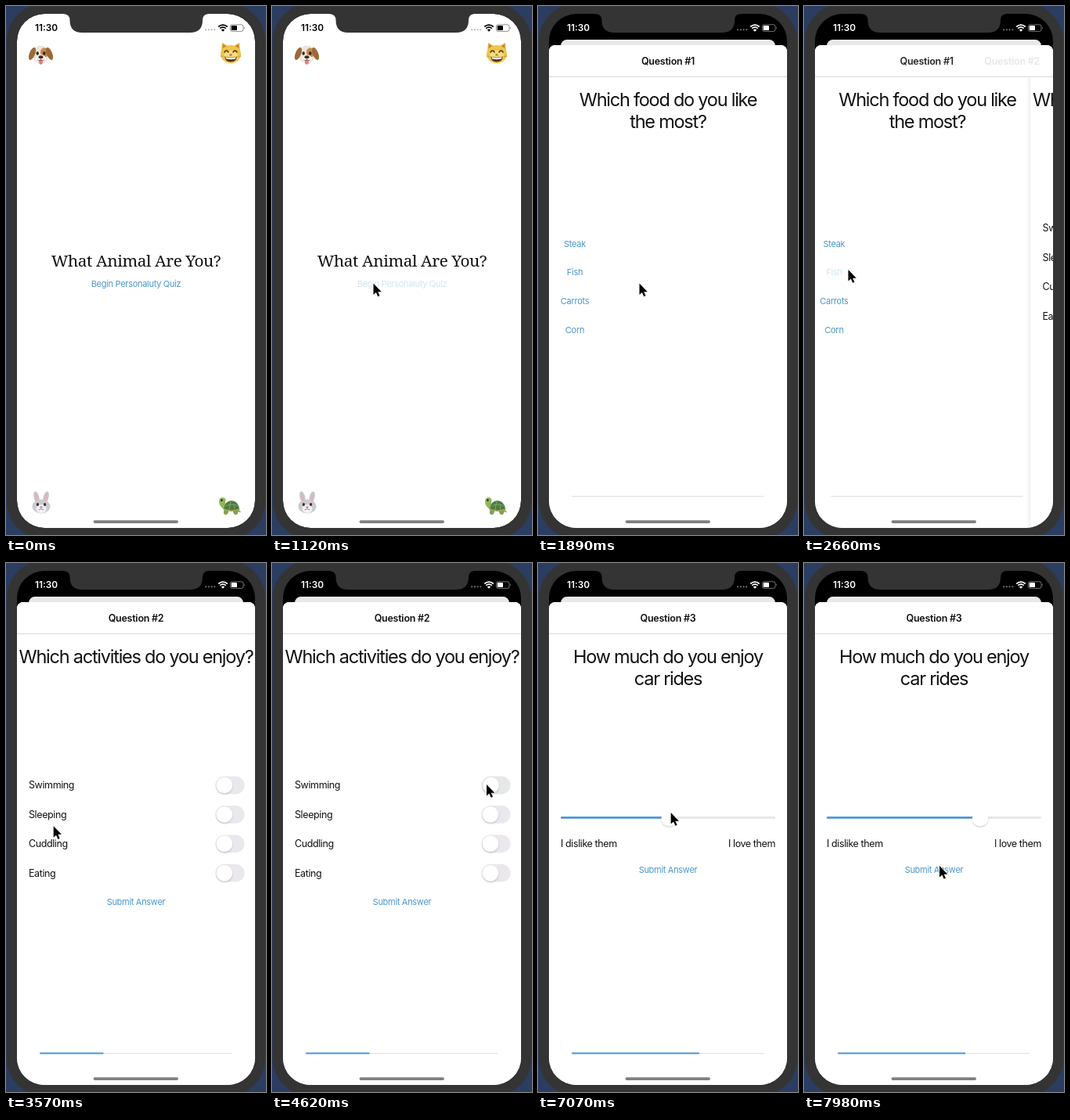
Animation, 332 px wide and 676 px high, one loop 8 s. Source, as an HTML page:

```html
<!DOCTYPE html>
<html lang="en">
<head>
<meta charset="utf-8">
<title>Animal quiz</title>
<style>
html, body { margin: 0; width: 100%; height: 100%; overflow: hidden; background: #2b3d60; }
svg { display: block; width: 332px; height: 676px; }
text { font-family: Inter, Roboto, sans-serif; font-optical-sizing: none; fill: #111; }
.mid { text-anchor: middle; }
.end { text-anchor: end; }
.hero { font: 20.8px "Noto Serif", serif; letter-spacing: -.02em; }
.ask { font-size: 23.5px; letter-spacing: -.053em; }
.title { font-size: 12.5px; font-weight: 600; letter-spacing: -.02em; }
.label { font-size: 12.5px; letter-spacing: -.032em; }
.link { font-size: 11px; letter-spacing: -.027em; fill: #4a97cb; }
.clock { font-size: 11.8px; font-weight: 600; fill: inherit; }
</style>
</head>
<body>
<svg id="stage" viewBox="0 0 332 676"></svg>
<script>
const LOOP = 8000, STEP = 70, BLUE = '#4f97d8';
const stage = document.getElementById('stage');

const text = (cls, x, y, str, id = '') => `<text class="${cls}" x="${x}" y="${y}" ${id && `id="${id}"`}>${str}</text>`;
const rect = (x, y, w, h, fill, r = 0, more = '') =>
  `<rect x="${x}" y="${y}" width="${w}" height="${h}" rx="${r}" fill="${fill}" ${more}/>`;
const oval = (x, y, rx, ry, fill, turn = 0) =>
  `<ellipse cx="${x}" cy="${y}" rx="${rx}" ry="${ry}" fill="${fill}" transform="rotate(${turn} ${x} ${y})"/>`;
const path = (d, fill, more = '') => `<path d="${d}" fill="${fill}" ${more}/>`;
const stroke = (d, color, width) => path(d, 'none', `stroke="${color}" stroke-width="${width}" stroke-linecap="round"`);
const at = (x, y, body) => `<g transform="translate(${x} ${y})">${body}</g>`;
const knob = (id, x, y) => `<circle id="${id}" cx="${x}" cy="${y}" r="10.2" fill="#fff" filter="url(#soft)"/>`;

const dog = oval(0, 0, 10.5, 11.5, '#eee4d8') + oval(4.5, -2.5, 5, 6, '#c18a4d', -15) +
  oval(-11, -1, 3.6, 8.5, '#9c6a3a', 22) + oval(11, -1, 3.6, 8.5, '#9c6a3a', -22) +
  oval(0, 5.5, 6.5, 5, '#faf5ee') + oval(0, 9.5, 2.4, 3.2, '#e87889') +
  oval(-4.3, -1.5, 1.7, 2.2, '#33251e') + oval(4.3, -1.5, 1.7, 2.2, '#33251e') +
  oval(0, 3.2, 3, 2, '#3a2c28') + stroke('M-4 7Q-1 9 0 6Q1 9 4 7', '#6b5143', .8);

const cat = path('M-12 -1L-11 -13L-4 -9H4L11 -13L12 -1Z', '#e0ae38') +
  path('M-10 -5L-9.5 -10.5L-6 -8ZM10 -5L9.5 -10.5L6 -8Z', '#b9763d') +
  oval(0, 1.5, 13, 11.5, '#efc549') + oval(0, 4, 9, 7, '#f6dc7c') +
  stroke('M-8 -1Q-5.5 -5 -3 -1M3 -1Q5.5 -5 8 -1', '#4b371c', 1.5) +
  path('M-8 4.5Q0 7 8 4.5Q7 11.5 0 11.5T-8 4.5Z', '#5b3520') +
  path('M-6.8 5.3Q0 7.2 6.8 5.3L6 7.6Q0 9 -6 7.6Z', '#fff') +
  oval(0, 2.4, 1.8, 1.2, '#b9695a') + stroke('M-13 4L-9 4.5M13 4L9 4.5', '#9a7a35', .6);

const rabbit = oval(-6, -7, 3.4, 8, '#c6c6ca', -14) + oval(6, -7, 3.4, 8, '#c6c6ca', 14) +
  oval(-6, -6.5, 1.7, 6, '#e3b3b8', -14) + oval(6, -6.5, 1.7, 6, '#e3b3b8', 14) +
  oval(0, 4.5, 11.5, 9, '#cbcbd0') + oval(0, 7.5, 6.5, 5.5, '#f0f0f2') +
  oval(-4.6, 2, 1.6, 2.1, '#3a3034') + oval(4.6, 2, 1.6, 2.1, '#3a3034') +
  oval(0, 5.4, 1.8, 1.2, '#d98490') + stroke('M-3 8.6Q-.5 9.6 0 7Q.5 9.6 3 8.6', '#777', .7) +
  rect(-1.3, 9.2, 2.6, 2.4, '#fff', .4);

const turtle = oval(-5, 8, 3, 4, '#7da24c', 12) + oval(7, 8, 3, 4, '#7da24c', -12) +
  path('M10 5L14.5 9L8 8Z', '#7da24c') +
  path('M-8 5Q-13 2 -14 -4Q-14 -11 -9 -10Q-4 -9 -6 -4Q-5 1 -2 3Z', '#93b659') +
  path('M-8 5Q-6 -6 2 -6Q11 -5 12 5Q2 10 -8 5Z', '#4c7a44') +
  stroke('M-5 1L0 -1L5 -1L10 1M0 -1L1 -5M0 -1L-1 6M5 -1L6 6', '#85a75e', 1) +
  stroke('M-8 5Q2 9 12 5', '#a3a95c', 1.5) + oval(-10.5, -6.5, 1.2, 1.5, '#222');

const cursorShape = 'M0 0V14.6L3.4 11.5L5.7 16.8L8 15.8L5.7 10.7H10.3Z';

const progress = part => rect(43, 626, 245, 1.3, '#e3e3e3') + rect(43, 625.6, 245 * part, 1.9, BLUE, .9);
const view = (id, part, body) =>
  `<g id="${id}">${rect(14, 90, 304, 640, '#fff', 0, 'filter="url(#edge)"')}${body}${progress(part)}</g>`;

const foods = ['Steak', 'Fish', 'Carrots', 'Corn'].map((s, i) =>
  text('link mid', 47, 307.5 + i * 36.7, s, s === 'Fish' ? 'fish' : '')).join('');
const hobbies = ['Swimming', 'Sleeping', 'Cuddling', 'Eating'].map((s, i) => {
  const y = 284 + i * 37.4;
  return text('label', 29, y + 4.3, s) + rect(267.5, y - 11.4, 37, 22.8, '#ebe8ed', 11.4, i ? '' : 'id="track"') +
    knob('knob' + i, 278.9, y);
}).join('');

stage.innerHTML = `
<defs>
  <clipPath id="screen">${rect(14, 10, 304, 657, '#fff', 35)}</clipPath>
  <filter id="soft" x="-50%" y="-50%" width="200%" height="200%">
    <feDropShadow dx="0" dy="1.4" stdDeviation="1.3" flood-opacity=".2"/></filter>
  <filter id="edge" x="-5%" y="-2%" width="110%" height="104%">
    <feDropShadow dx="-1" dy="0" stdDeviation="2.5" flood-opacity=".12"/></filter>
</defs>
${rect(0, 0, 332, 676, '#2b3d60')}
${rect(.8, -4, 330.4, 686, '#343434', 50)}
<g clip-path="url(#screen)">
  ${rect(14, 10, 304, 657, '#000')}
  <g id="home">
    ${rect(14, 10, 304, 657, '#fff', 35, 'id="card"')}
    ${at(44.5, 62, dog)}${at(287, 60, cat)}${at(45, 635, rabbit)}${at(286, 638, turtle)}
    ${text('hero mid', 166, 332.5, 'What Animal Are You?')}
    ${text('link mid', 166, 358.7, 'Begin Personaluty Quiz', 'begin')}
    ${rect(14, 10, 304, 657, '#000', 35, 'id="dim"')}
  </g>
  <g id="modal">
    ${rect(14, 50, 304, 720, '#fff', 8)}
    ${view('view0', 0, text('ask mid', 166, 128, 'Which food do you like') +
      text('ask mid', 166, 156, 'the most?') + foods)}
    ${view('view1', 1 / 3, text('ask mid', 166, 128, 'Which activities do you enjoy?') + hobbies +
      text('link mid', 166, 437.3, 'Submit Answer', 'submit1'))}
    ${view('view2', 2 / 3, text('ask mid', 166, 128, 'How much do you enjoy') +
      text('ask mid', 166, 156, 'car rides') +
      rect(29, 324, 274, 2.8, '#e6e6e6', 1.4) + rect(29, 324, 137, 2.8, BLUE, 1.4, 'id="fill"') +
      knob('thumb', 166, 326) + text('label', 29, 363, 'I dislike them') +
      text('label end', 303, 363, 'I love them') + text('link mid', 166, 396, 'Submit Answer'))}
    ${rect(14, 50, 304, 41, '#fff', 8)}
    ${rect(14, 90, 304, .9, '#d9d9d9')}
    ${[0, 1, 2].map(i => text('title mid', 166, 74.5, 'Question #' + (i + 1), 'title' + i)).join('')}
  </g>
  ${rect(111.5, 657.3, 108.5, 3.6, '#808080', 1.8)}
</g>
${path('M73 9H259V10Q251 10.5 251 18Q251 34 235 34H97Q81.5 34 81.5 18Q81.5 10.5 73 10Z', '#343434')}
<g id="status">
  ${text('clock', 37, 32.3, '11:30')}
  ${[0, 1, 2, 3].map(i => `<circle cx="${255.2 + i * 3.7}" cy="30.3" r="1.1" fill="#999" opacity=".75"/>`).join('')}
  <path d="M277 32.8L274.8 30.4Q277 28.6 279.2 30.4Z"/>
  <g fill="none" stroke-width="1.7"><path d="M273.2 28.7Q277 25.6 280.8 28.7M271.2 26.5Q277 21.7 282.8 26.5"/></g>
  <rect x="286.4" y="23.8" width="16.6" height="8.6" rx="2.4" fill="none" stroke-width=".9" opacity=".5"/>
  <rect x="287.7" y="25.1" width="7.3" height="6" rx="1.2" stroke="none"/>
  <path d="M304.2 26.6Q306 28.1 304.2 29.6Z" stroke="none" opacity=".5"/>
</g>
<path id="cursor" d="${cursorShape}" fill="#000" stroke="#fff" stroke-width="1.1" paint-order="stroke"/>`;

const el = {};
stage.querySelectorAll('[id]').forEach(n => el[n.id] = n);
const set = (id, attrs) => { for (const k in attrs) el[id].setAttribute(k, attrs[k]); };
const move = (id, x, y) => set(id, { transform: `translate(${x} ${y})` });

const clamp = u => Math.min(1, Math.max(0, u));
const span = (t, from, to) => clamp((t - from) / (to - from));
const mix = (a, b, u) => a + (b - a) * u;
const smooth = u => u * u * (3 - 2 * u);
const spring = u => (1 - (1 + 8 * u) * Math.exp(-8 * u)) / (1 - 9 * Math.exp(-8));

// Rows of [time, ...values], eased between neighbours.
function track(rows, t) {
  let i = 0;
  while (i < rows.length - 2 && t >= rows[i + 1][0]) i++;
  const [a, b] = [rows[i], rows[i + 1]];
  const u = smooth(span(t, a[0], b[0]));
  return a.slice(1).map((v, k) => mix(v, b[k + 1], u));
}

const pointer = [
  [0, 334, 520], [770, 129.5, 354.5], [1890, 129.5, 354.5], [2450, 56.5, 337], [3500, 56.5, 337],
  [4340, 268, 294], [4480, 274, 283], [4760, 274, 283], [5400, 158, 430.5], [5530, 158.5, 433],
  [6510, 158.5, 433], [7000, 169.5, 319], [7060, 169.5, 319], [7400, 229, 317.5],
  [7490, 230, 316], [7980, 173, 387]
];
const pressed = (id, t, from) =>
  set(id, { opacity: t < from ? 1 : mix(.25, 1, span(t, from + 120, from + 400)) });

function draw(t) {
  const rise = spring(span(t, 1150, 1890));
  const scale = mix(1, .902, rise);
  const corner = mix(35, 9, clamp(rise * 3));
  set('home', { transform: `translate(166 ${mix(10, 43, rise)}) scale(${scale}) translate(-166 -10)` });
  set('card', { rx: corner });
  set('dim', { rx: corner, opacity: .09 * rise });
  move('modal', 0, mix(617, 0, rise));
  const shade = Math.round(255 * span(t, 1290, 1590));
  const ink = `rgb(${shade},${shade},${shade})`;
  set('status', { fill: ink });
  el.status.querySelectorAll('g, rect').forEach(n => n.hasAttribute('stroke-width') && n.setAttribute('stroke', ink));

  const push = [1, spring(span(t, 2630, 3100)), spring(span(t, 5980, 6410)), 0];
  for (let i = 0; i < 3; i++) {
    const come = push[i], leave = push[i + 1];
    const shown = come > 0 && leave < 1 ? 'visible' : 'hidden';
    set('view' + i, { visibility: shown });
    move('view' + i, 304 * (1 - come) - 91 * leave, 0);
    set('title' + i, { opacity: come * (1 - leave) });
    move('title' + i, 110 * (1 - come) - 100 * leave, 0);
  }

  const on = smooth(span(t, 4590, 4840));
  set('knob0', { cx: mix(278.9, 293.1, on) });
  set('track', { fill: `rgb(${mix(235, 120, on)},${mix(232, 204, on)},${mix(237, 116, on)})` });

  const [thumb] = track([[7040, 166.5], [7400, 225]], t);
  set('thumb', { cx: thumb });
  set('fill', { width: thumb - 29 });

  pressed('begin', t, 1050);
  pressed('fish', t, 2590);
  pressed('submit1', t, 5950);
  move('cursor', ...track(pointer, t));
}

function frame(now) {
  draw(Math.floor((now % LOOP) / STEP) * STEP);
  requestAnimationFrame(frame);
}
draw(0);
requestAnimationFrame(frame);
</script>
</body>
</html>
```
